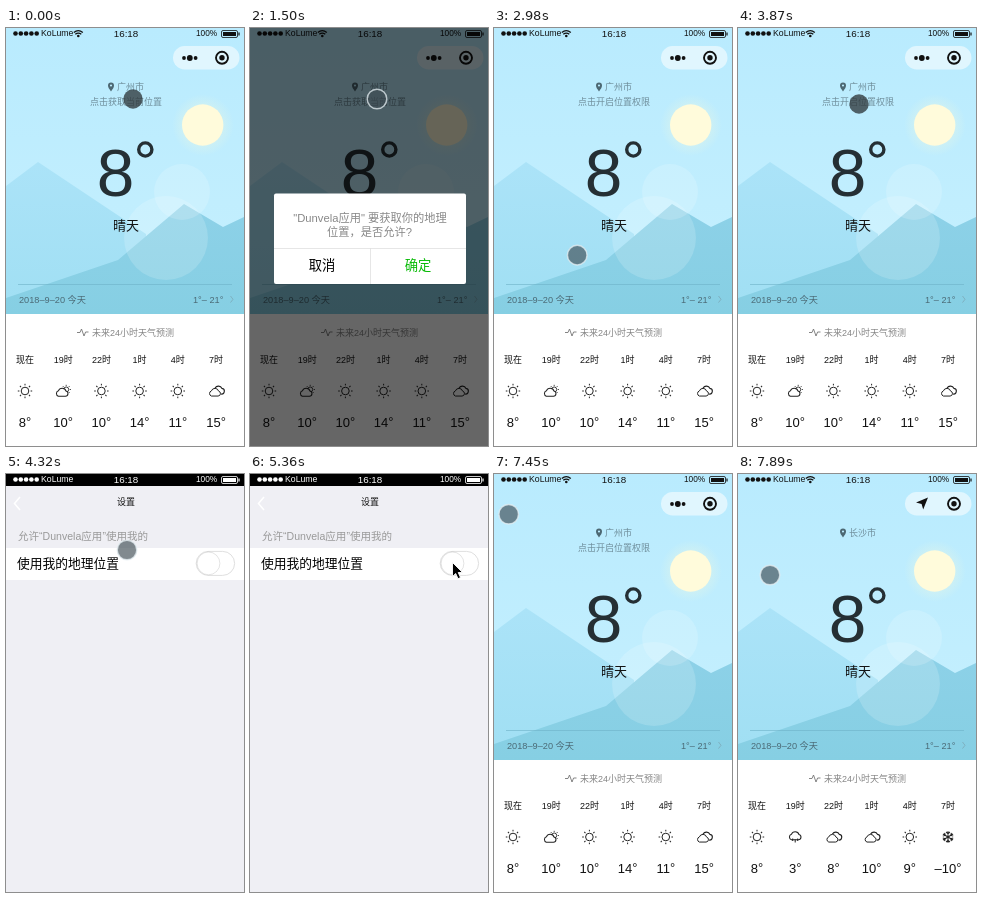
Animation, 238 px wide and 418 px high, one loop 8 s. Source, as an HTML page:

```html
<!DOCTYPE html>
<html lang="zh">
<head>
<meta charset="utf-8">
<title>天气</title>
<style>
html, body { margin: 0; height: 100%; overflow: hidden; background: #fff; }
svg { display: block; width: 100vw; height: 100vh; font-family: "Liberation Sans", "Noto Sans CJK SC", "Noto Sans CJK", sans-serif; }
</style>
</head>
<body>
<svg viewBox="0 0 238 418">
  <defs>
    <linearGradient id="sky" x2="0" y2="1"><stop stop-color="#b9ebfe"/><stop offset="1" stop-color="#c6f0fe"/></linearGradient>
    <linearGradient id="far" x2="0" y2="1"><stop stop-color="#abe3f8"/><stop offset="1" stop-color="#a0dff3"/></linearGradient>
    <linearGradient id="near" x2="0" y2="1"><stop stop-color="#8dd1e8"/><stop offset="1" stop-color="#86cfe3"/></linearGradient>
    <radialGradient id="glow"><stop offset=".6" stop-color="#fffbd5" stop-opacity=".25"/><stop offset="1" stop-color="#fffbd5" stop-opacity="0"/></radialGradient>
  </defs>
  <g id="stage"></g>
</svg>
<script>
const LOOP = 8000;
const stage = document.getElementById('stage');

// y is the visual middle of the line
const text = (x, y, size, str, fill = '#111', anchor = 'start') =>
  `<text x="${x}" y="${y + size * .36}" font-size="${size}" fill="${fill}" text-anchor="${anchor}">${str}</text>`;
const mid = (x, y, size, str, fill) => text(x, y, size, str, fill, 'middle');
const medium = body => `<g font-weight="500">${body}</g>`;
const rect = (x, y, w, h, fill, more = '') =>
  `<rect x="${x}" y="${y}" width="${w}" height="${h}" fill="${fill}" ${more}/>`;
const circle = (x, y, r, fill, more = '') =>
  `<circle cx="${x}" cy="${y}" r="${r}" fill="${fill}" ${more}/>`;
const path = (d, fill = 'none', stroke = 'none', width = 1, more = '') =>
  `<path d="${d}" fill="${fill}" stroke="${stroke}" stroke-width="${width}" ${more}/>`;
const at = (x, y, body, more = '') => `<g transform="translate(${x} ${y}) ${more}">${body}</g>`;
const spokes = (n, d, width = 1) => Array.from({ length: n }, (_, i) =>
  path(d, 'none', '#222', width, `transform="rotate(${i * 360 / n})"`)).join('');

const cloud = path('M-4 4.5H3.4A2.8 2.8 0 0 0 4-1A4.2 4.2 0 0 0-4-1.2A3 3 0 0 0-4 4.5Z', '#fff', '#222', 1.1);
const icons = {
  sun: circle(0, 0, 3.8, 'none', 'stroke="#222"') + spokes(8, 'M0-5.6V-7.2'),
  partly: at(3, -1.5, circle(0, 0, 2.8, 'none', 'stroke="#222"') + spokes(8, 'M0-4V-5.2'), 'scale(.9)') +
    at(-1, 1, cloud, 'scale(.95)'),
  cloudy: path('M-1-3A4 4 0 0 1 6-2.6A2.8 2.8 0 0 1 5 3', 'none', '#222', 1.1) + at(-1, 1, cloud, 'scale(.9)'),
  rain: at(0, -1.5, cloud, 'scale(.95)') + path('M-2.5 1.5V4M0 2.5V5.5M2.5 1.5V4', 'none', '#222', 1),
  snow: spokes(6, 'M0 0V-5.8M-1.8-5L0-3.2L1.8-5', 1.1)
};

const hours = ['现在', '19时', '22时', '1时', '4时', '7时'];
const before = {
  city: '广州市',
  sky: ['sun', 'partly', 'sun', 'sun', 'sun', 'cloudy'],
  temp: [8, 10, 10, 14, 11, 15]
};
const after = {
  city: '长沙市',
  sky: ['sun', 'rain', 'cloudy', 'cloudy', 'sun', 'snow'],
  temp: [8, 3, 8, 10, 9, '–10']
};

function statusBar(ink) {
  let s = '';
  for (let i = 0; i < 5; i++) s += circle(9.5 + i * 5.3, 5.5, 2.3, ink);
  return s + text(35, 5.3, 8.7, 'KoLume', ink) + mid(120, 5, 9.8, '16:18', ink) +
    text(190, 5.3, 8.3, '100%', ink) +
    rect(215.5, 2.5, 16, 7, 'none', `rx="1.5" stroke="${ink}" stroke-width=".8"`) +
    rect(217, 4, 13, 4, ink) + rect(232.4, 4.5, 1.2, 3, ink);
}

function home(data, tip, located) {
  const gray = '#6f8e9b';
  let s = rect(0, 0, 238, 286, 'url(#sky)') +
    circle(197, 97, 31, 'url(#glow)') + circle(196.7, 97, 20.7, '#fffbdb') +
    path('M0 158L32 134L140 206V286H0Z', 'url(#far)') +
    path('M0 270L112 232L178 176L217 199L238 189V286H0Z', 'url(#near)') +
    circle(176, 164, 28, '#fff', 'opacity=".16"') + circle(160, 210, 42, '#fff', 'opacity=".16"') +
    rect(0, 286, 238, 132, '#fff') + statusBar('#111') +
    path('M67.8 4.6Q72.3.8 76.8 4.6M69.3 6.3Q72.3 3.8 75.3 6.3', 'none', '#111', 1.3) + circle(72.3, 8, 1.3, '#111') +
    rect(167, 18, 66.5, 23.5, '#fff', 'rx="11.75" opacity=".55"');
  s += located
    ? path('M190 23.5L185.2 35.5L183.6 30L178 28.4Z', '#111')
    : circle(178, 30, 1.9, '#111') + circle(183.8, 30, 2.9, '#111') + circle(189.6, 30, 1.9, '#111');
  s += circle(216, 29.8, 6, 'none', 'stroke="#111" stroke-width="1.9"') + circle(216, 29.8, 2.7, '#111') +
    path('M105 63.5C103 60.5 102 59.5 102 57.5A3 3 0 0 1 108 57.5C108 59.5 107 60.5 105 63.5ZM105 56.4A1.1 1.1 0 1 0 105 58.6A1.1 1.1 0 1 0 105 56.4Z', '#4d6873', 'none', 0, 'fill-rule="evenodd"') +
    text(111, 58.7, 9, data.city, gray) + mid(120, 74.2, 9, tip, gray) +
    mid(109.5, 143.3, 67.5, '8', '#252f34') +
    circle(139.3, 121.5, 6.6, 'none', 'stroke="#252f34" stroke-width="3.4"') +
    mid(120, 197, 13, '晴天') +
    rect(12, 256, 214, .6, '#6fb3c8') +
    text(13, 271.5, 9.2, '2018–9–20 今天', '#4b6a76') + text(187, 271.5, 9.2, '1°– 21°', '#4b6a76') +
    path('M224.5 268L227 271.3L224.5 274.6', 'none', '#7ba9b8', .8) +
    path('M71 304.5H74L75.5 301L78 308L79.6 304H82.5', 'none', '#777', .9) +
    text(86, 304.3, 9, '未来24小时天气预测', '#858585');
  hours.forEach((hour, i) => {
    const x = 19 + i * 38.2;
    s += medium(mid(x, 331.3, 9, hour)) + at(x, 363, icons[data.sky[i]]) +
      mid(x, 394.8, 13, data.temp[i] + '<tspan dy="-1">°</tspan>');
  });
  return s;
}

function dialog(pressed) {
  return rect(0, 0, 238, 418, '#000', 'opacity=".6"') +
    rect(24, 165.5, 192, 90.5, '#fff', 'rx="2"') +
    (pressed ? rect(24, 221, 96, 35, '#ebebeb') : '') +
    mid(120, 189.5, 11.25, '"Dunvela应用" 要获取你的地理', '#888') +
    mid(119.5, 203.8, 11.25, '位置，是否允许?', '#888') +
    rect(24, 220.3, 192, .7, '#dcdcdc') + rect(120, 220.3, .7, 35.7, '#dcdcdc') +
    mid(72, 237.3, 13.3, '取消', '#000') + mid(168, 237.3, 13.3, '确定', '#09bb07');
}

function settings(on) {
  return rect(0, 0, 238, 418, '#efeff4') + rect(0, 0, 238, 12, '#000') + statusBar('#fff') +
    path('M14 23L8.5 29.5L14 36', 'none', '#fff', 1.6) +
    medium(mid(120, 28, 9, '设置') + text(12, 62, 10.55, '允许“Dunvela应用”使用我的', '#999')) +
    rect(0, 74, 238, 32, '#fff') +
    text(11, 89.3, 12.75, '使用我的地理位置', '#000') +
    rect(190.2, 77.4, 38.4, 24, on ? '#04be02' : '#fff', `rx="12" stroke="${on ? '#04be02' : '#dfdfdf'}"`) +
    circle(202.5 + 13.8 * on, 89.4, 11.4, '#fff', 'stroke="#000" stroke-opacity=".14" stroke-width=".8"');
}

const cursors = {
  press: circle(0, 0, 9.7, '#30383c', 'opacity=".78"'),
  ring: circle(0, 0, 9.8, '#3e4c53', 'fill-opacity=".65" stroke="#e4eef2" stroke-opacity=".75" stroke-width="1.5"'),
  arrow: path('M0 0V14L3.2 11L5.5 16.2L8 15L5.7 10H10Z', '#000', '#fff', .9),
  hand: path('M-1.6.8Q0-1 1.6.8V7Q3 5.5 4.4 6.8Q6 6 7.2 7.6Q9 7 10 9V13L8 17H0L-4.5 10.5Q-4 7.8-1.6 10ZM4.4 6.8V9.5M7.2 7.6V10', '#fff', '#000', 1.1)
};

// stepped progress: first step lands at a, last one at b
const step = (t, a, b, n) =>
  t < a ? 0 : Math.min(1, (Math.floor((t - a) / (b - a) * (n - 1) + 1e-6) + 1) / n);
const ease = p => p * p * (3 - 2 * p);

const moves = [
  [1800, 2240, 4, 81, 236],
  [2980, 3870, 7, 121, 76],
  [4920, 5360, 4, 202.5, 88.5],
  [5810, 6700, 7, 11.5, 29],
  [7450, 7890, 4, 32, 101]
];

function pointer(t) {
  let x = 127, y = 71;
  for (const [a, b, n, toX, toY] of moves) {
    const p = ease(step(t, a, b, n));
    x += (toX - x) * p;
    y += (toY - y) * p;
  }
  const kind = t < 1500 ? 'press' : t < 2240 ? 'ring' : t < 2980 ? 'hand' : t < 3870 ? 'ring' :
    t < 4320 ? 'press' : t < 4920 ? 'ring' : t < 6850 ? 'arrow' : t < 7450 ? 'hand' : 'ring';
  return at(x.toFixed(2), y.toFixed(2), cursors[kind]);
}

function scene(t) {
  const ask = '点击获取当前位置', open = '点击开启位置权限';
  let s;
  if (t < 2980) s = home(before, ask) + (t >= 1500 ? dialog(t >= 2840) : '');
  else if (t < 4320) s = home(before, open);
  else if (t < 7450) s = settings(step(t, 5660, 5810, 2));
  else if (t < 7740) s = home(before, open, t >= 7600);
  else s = home(after, '', true);
  return s + pointer(t);
}

let shown;
function frame() {
  const s = scene(performance.now() % LOOP);
  if (s !== shown) stage.innerHTML = shown = s;
  requestAnimationFrame(frame);
}
frame();
</script>
</body>
</html>
```
